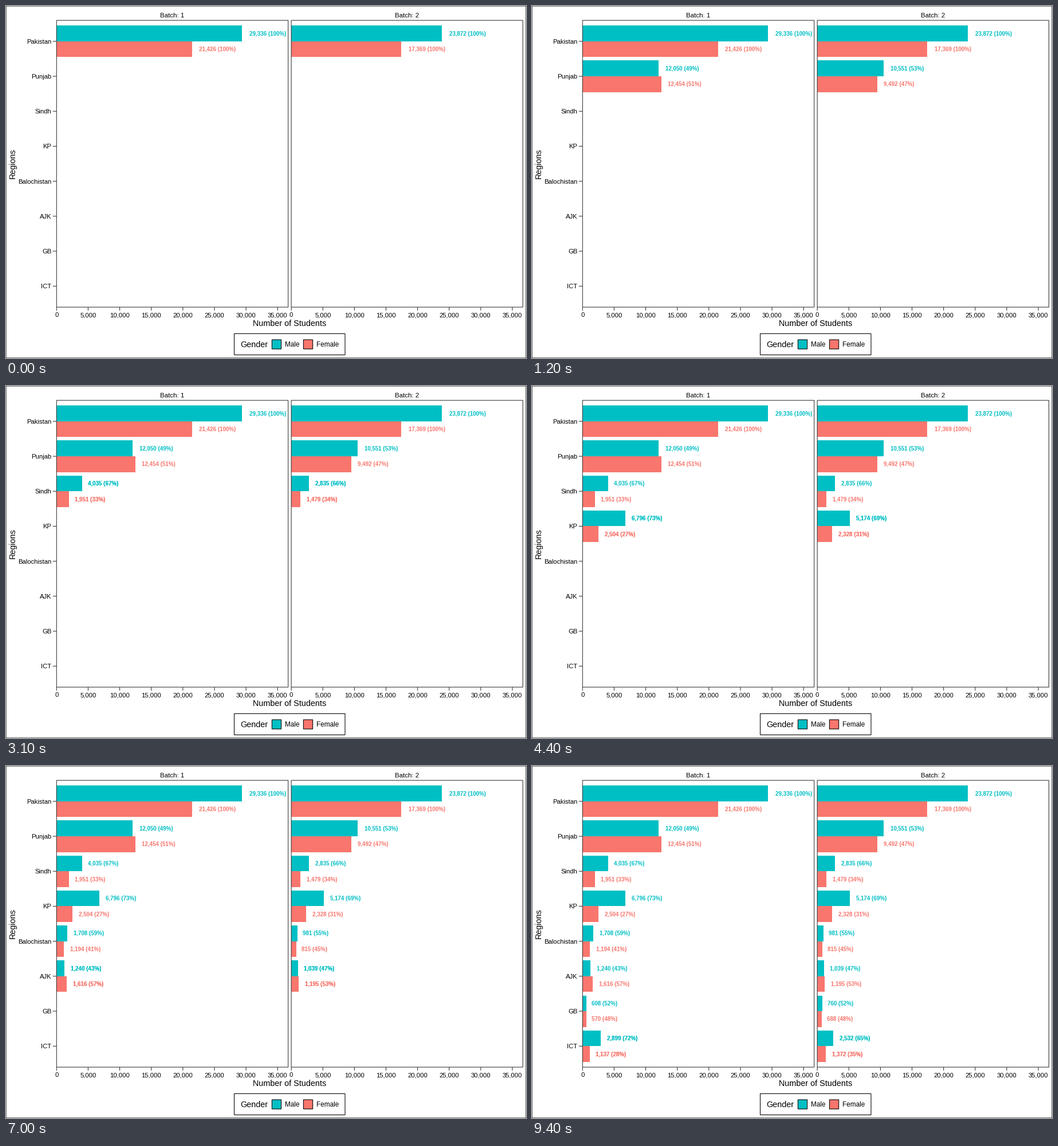
Animation of 908 by 616 pixels, one loop 10000 ms. Source, as a matplotlib script:

```python
import numpy as np
import matplotlib.pyplot as plt
from matplotlib.animation import FuncAnimation
from matplotlib.patches import Rectangle

W, H, DPI = 908, 616, 100
STEP, LOOP = 100, 10000
MALE, FEMALE, INK = "#00BFC4", "#F8766D", "#333333"
PT = 72 / DPI  # points per pixel
LINE = 1.07 * PT

# Two equal panels, with the same gap between them and at the right edge.
GAP, LEFT, TOP, BOTTOM = 5.48, 88.3, 25.1, 527.0
RIGHT = W - GAP
PANEL_W = (RIGHT - GAP - LEFT) / 2
PANEL_X = (LEFT, RIGHT - PANEL_W)
ROW = (BOTTOM - TOP) / 8.2
BAR = 0.45 * ROW

# Students per province: (male, female) in each batch.
PROVINCES = {
    "Punjab": ((12050, 12454), (10551, 9492)),
    "Sindh": ((4035, 1951), (2835, 1479)),
    "KP": ((6796, 2504), (5174, 2328)),
    "Balochistan": ((1708, 1194), (981, 815)),
    "AJK": ((1240, 1616), (1039, 1195)),
    "GB": ((608, 570), (760, 688)),
    "ICT": ((2899, 1137), (2532, 1372)),
}
counts = np.array(list(PROVINCES.values()))
totals = counts.sum(axis=0)
shares = 100 * counts / counts.sum(axis=2, keepdims=True)
regions = ["Pakistan", *PROVINCES]
counts = np.vstack([totals[None], counts])
shares = np.vstack([np.full((1, 2, 2), 100), shares])
UNIT = PANEL_W / (1.25 * counts.max())

# When each row appears, and when its labels are overprinted.
index = np.arange(len(regions))
starts = np.interp(index, [0, 1, 5, 7], [0, 1200, 6400, 8800])
settles = np.interp(index, [0, 5, 7], [500, 7000, 9400])
ends = np.append(starts[1:], LOOP)

plt.rcParams["font.family"] = "Liberation Sans"
fig = plt.figure(figsize=(W / 100, H / 100), dpi=DPI, facecolor="white")
ax = fig.add_axes([0, 0, 1, 1])
ax.set_xlim(0, W)
ax.set_ylim(H, 0)
ax.axis("off")
renderer = fig.canvas.get_renderer()


def box(x0, y0, x1, y1, fill="none", edge="none", z=1):
    return ax.add_patch(Rectangle((x0, y0), x1 - x0, y1 - y0, facecolor=fill,
                                  edgecolor=edge, linewidth=LINE, zorder=z,
                                  snap=False))


def line(x0, y0, x1, y1):
    ax.plot([x0, x1], [y0, y1], color=INK, linewidth=LINE, zorder=3,
            solid_capstyle="butt", snap=False)


def text(x, y, s, size, ha="center", color="black", **kw):
    return ax.text(x, y, s, fontsize=size * PT, ha=ha, va="baseline",
                   color=color, zorder=4, **kw)


def bar_label(end, y, s, color):
    label = text(end, y + 3.6, s, 9.8, "left", color, weight="bold")
    label.set_x(end + 0.2 * label.get_window_extent(renderer).width)
    return label


def draw_frame():
    box(0, 0, W, H, edge="black")
    for batch, x0 in enumerate(PANEL_X, 1):
        box(x0, TOP, x0 + PANEL_W, BOTTOM, edge=INK, z=3)
        text(x0 + PANEL_W / 2, 20, f"Batch: {batch}", 11.5)
        for value in range(0, 35001, 5000):
            x = x0 + value * UNIT
            line(x, BOTTOM, x, BOTTOM + 6)
            text(x, 544, f"{value:,}", 11.3)
    text((LEFT + RIGHT) / 2, 560, "Number of Students", 14.35)
    text(16, (TOP + BOTTOM) / 2, "Regions", 14.35,
         rotation=90, rotation_mode="anchor")


def draw_legend():
    box(398.5, 573.4, 592, H - GAP, "white", "black")
    text(409.5, 597, "Gender", 14.35, "left")
    for x, name, color in ((464.4, "Male", MALE), (519.4, "Female", FEMALE)):
        box(x, 584, x + 16.2, 600.2, color, "black")
        text(x + 22.4, 596.3, name, 11.8, "left")


def draw_row(i):
    """Return the bars with their labels, and the overprinted labels."""
    y = TOP + (0.6 + i) * ROW
    line(LEFT - 6.5, y, LEFT, y)
    text(79.3, y + 4, regions[i], 11.2, "right")
    shown, echo = [], []
    for batch, x0 in enumerate(PANEL_X):
        for sex, color in enumerate((MALE, FEMALE)):
            count, share = counts[i, batch, sex], shares[i, batch, sex]
            end, top = x0 + count * UNIT, y + (sex - 1) * BAR
            corners = (round(v) for v in (x0, top, end, top + BAR))
            shown.append(box(*corners, color))
            for layer in (shown, echo):
                layer.append(bar_label(end, top + BAR / 2,
                                       f"{count:,} ({share:.0f}%)", color))
    return shown, echo


draw_frame()
draw_legend()
rows = [draw_row(i) for i in index]


def update(frame):
    t = frame * STEP
    for start, settle, end, (shown, echo) in zip(starts, settles, ends, rows):
        for artist in shown:
            artist.set_visible(bool(t >= start))
        for artist in echo:
            artist.set_visible(bool(settle <= t < end))
    return []


anim = FuncAnimation(fig, update, frames=LOOP // STEP, interval=STEP,
                     repeat=True, repeat_delay=0, blit=False)
plt.show()
```
